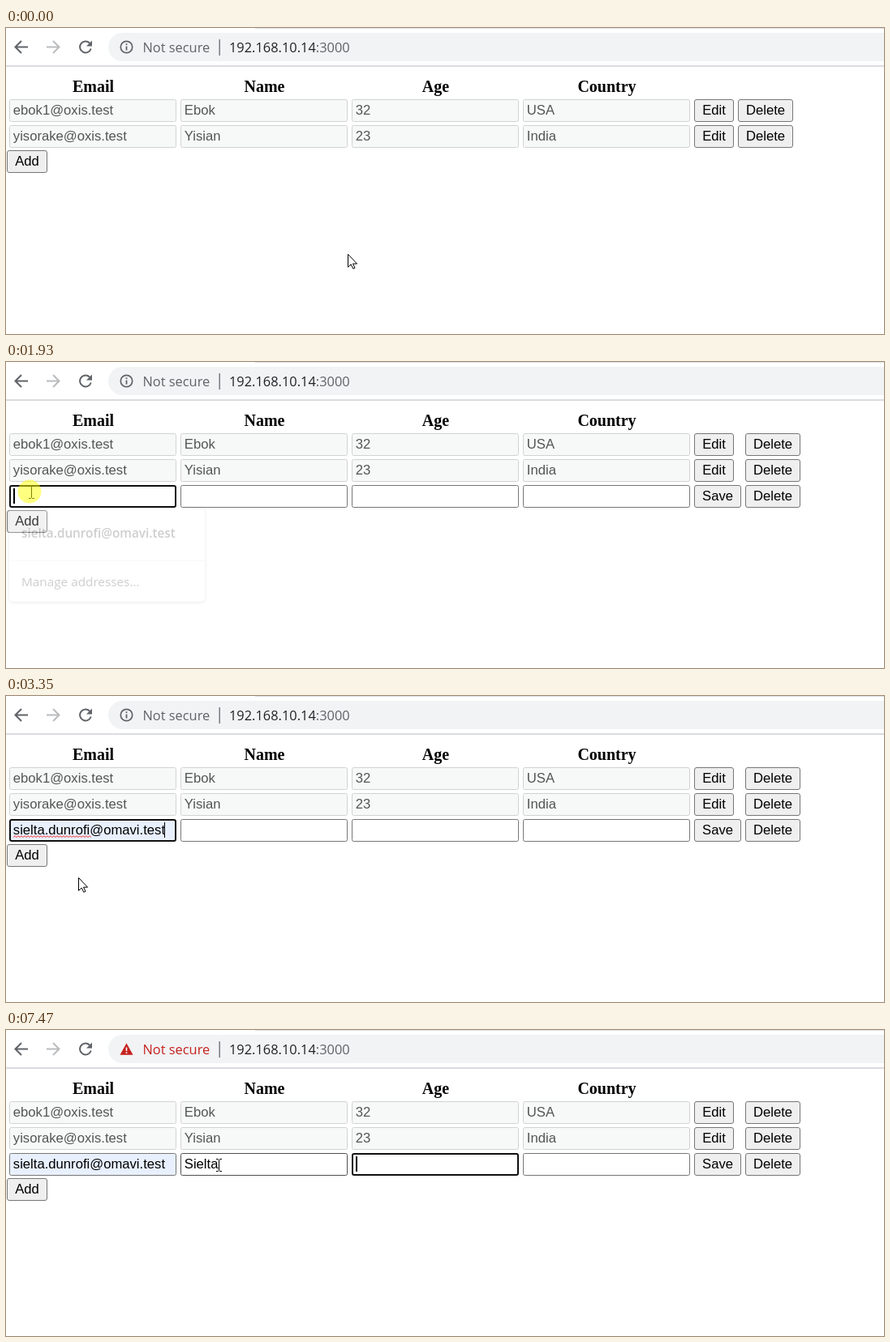
Write an HTML page that moves like this. It is 1082 px wide and 378 px high and loops after 8 s.

```html
<!DOCTYPE html>
<html lang="en">
<head>
<meta charset="utf-8">
<title>Editable table</title>
<style>
  html, body { margin: 0; width: 100%; height: 100%; overflow: hidden; background: #fff; }
  svg { display: block; }
  text { white-space: pre; font: 16.667px "Liberation Sans", Arial, sans-serif; }
  .head { font: bold 20px "Liberation Serif", "Times New Roman", serif; text-anchor: middle; }
  .bar { font: 16.4px "Open Sans", "Noto Sans", sans-serif; }
  .menu { font: 15.3px "Open Sans", "Noto Sans", sans-serif; fill: #2c2d30; }
  .strong { font-weight: 600; }
  .mid { text-anchor: middle; }
</style>
</head>
<body>
<svg id="stage" width="1082" height="378" viewBox="0 0 1082 378"></svg>
<script>
const LOOP = 8000;
const EMAIL = "sielta.dunrofi@omavi.test";
const NAME = "Sielta";
const ROW = 32, FIELD = 206, HEIGHT = 28;
const colX = i => 4 + 211 * i;
const rowY = r => 88 + ROW * r;
const stage = document.getElementById("stage");

function set(el, attrs) {
  for (const k in attrs) el.setAttribute(k, attrs[k]);
}
function add(tag, attrs, parent = stage, text) {
  const el = document.createElementNS("http://www.w3.org/2000/svg", tag);
  set(el, attrs);
  if (text !== undefined) el.textContent = text;
  parent.appendChild(el);
  return el;
}
const group = () => add("g", {});
const show = (el, on) => set(el, { visibility: on ? "visible" : "hidden" });
const place = (el, x, y) => set(el, { transform: `translate(${x} ${y})` });
const line = (d, stroke, width, parent) =>
  add("path", { d, stroke, "stroke-width": width, fill: "none" }, parent);

function field(col, row, value, parent, locked) {
  const x = colX(col), y = rowY(row);
  const box = add("rect", {
    x: x + .5, y: y + .5, width: FIELD - 1, height: HEIGHT - 1, rx: 2,
    fill: locked ? "#f7f9f8" : "#fff", stroke: locked ? "#d1d3d2" : "#767676"
  }, parent);
  const text = add("text", { x: x + 4.8, y: y + 19, fill: locked ? "#545454" : "#000" }, parent, value);
  return { box, text, x, y };
}

function button(x, y, w, label, parent) {
  const g = add("g", {}, parent);
  place(g, x, y);
  const box = add("rect", {
    x: .5, y: .5, width: w - 1, height: HEIGHT - 1, rx: 2.5, fill: "#efefef", stroke: "#767676"
  }, g);
  add("text", { x: w / 2, y: 19, class: "mid" }, g, label);
  return { g, box };
}

// Browser toolbar
add("rect", { x: 307, y: 0, width: 775, height: 1, fill: "#dee1e6" });
add("rect", { x: 0, y: 46, width: 1082, height: 2, fill: "#dadce0" });
add("rect", { x: 126, y: 6, width: 990, height: 35, rx: 17.5, fill: "#f1f3f4" });
line("M27 23.5H11.5M19 16L11.5 23.5 19 31", "#5f6368", 2);
line("M50 23.5H65.5M58 16L65.5 23.5 58 31", "#babcbe", 2);
line("M103 18.5A7 7 0 1 0 104.7 25.5", "#5f6368", 2);
add("path", { d: "M106 15.5V22.5H99Z", fill: "#5f6368" });

const info = group();
add("circle", { cx: 148.5, cy: 23.5, r: 7.2, fill: "none", stroke: "#5f6368", "stroke-width": 1.7 }, info);
line("M148.5 22.5V27.5M148.5 19.2V21", "#5f6368", 1.8, info);
const warn = group();
add("path", { d: "M148.5 16.2L156.5 30.8H140.5Z", fill: "#c5221f" }, warn);
line("M148.5 21.5V26M148.5 27.3V29", "#fff", 1.6, warn);
const secure = add("text", { x: 168.5, y: 30, class: "bar" }, stage, "Not secure");
add("rect", { x: 262.5, y: 14, width: 1.4, height: 20, fill: "#6f7377" });
const url = add("text", { x: 275, y: 30, class: "bar", fill: "#202124" }, stage, "192.168.10.14");
add("tspan", { fill: "#5f6368" }, url, ":3000");

// Table
const heads = ["Email", "Name", "Age", "Country"];
heads.forEach((label, i) => add("text", { x: colX(i) + 103.5, y: 79, class: "head" }, stage, label));
const deletes = [
  ["ebok1@oxis.test", "Ebok", "32", "USA"],
  ["yisorake@oxis.test", "Yisian", "23", "India"]
].map((values, r) => {
  values.forEach((value, i) => field(i, r, value, stage, true));
  button(848, rowY(r), 49, "Edit");
  return button(902, rowY(r), 68, "Delete").g;
});
const newRow = group();
const inputs = heads.map((_, i) => field(i, 2, "", newRow));
button(848, rowY(2), 58, "Save", newRow);
button(911, rowY(2), 68, "Delete", newRow);
const addButton = button(1, 151, 50, "Add");
const squiggle = line("M9 174.5" + "l2 -1.8l2 1.8".repeat(24), "#f03030", 1);
const caret = add("rect", { y: 156, height: 19 });

// Autofill popup
const popup = group();
popup.style.filter = "drop-shadow(0 1px 2px rgba(0,0,0,.4))";
add("rect", { x: 4, y: 180, width: 241, height: 116, rx: 5, fill: "#fff" }, popup);
const choice = add("rect", { x: 4, y: 187, width: 241, height: 49, fill: "#e8e9ea" }, popup);
add("rect", { x: 4, y: 245, width: 241, height: 1, fill: "#e3e4e6" }, popup);
add("text", { x: 19, y: 217, class: "menu strong" }, popup, EMAIL);
add("text", { x: 19, y: 277, class: "menu" }, popup, "Manage addresses…");

// Pointer
const arrow = add("path", {
  d: "M.5 .5V16.4L4.2 13 6.8 18.4 9 17.4 6.5 12.2H11.6Z", fill: "#fff", stroke: "#000"
});
const beam = line("M-3.5 -7.5H-1L0 -6.5 1 -7.5H3.5M0 -6.5V6.5M-3.5 7.5H-1L0 6.5 1 7.5H3.5", "#000", 1);
const halo = add("circle", { r: 14.5, fill: "#ff0", opacity: .5 });

// Script of the session, in ms
const grow = 1150, open = 1860, pick = 3350, toName = 4440, toAge = 7470;
const keys = [5450, 5770, 6000, 6230, 6540, 6700];
const wakes = [open, pick, toName, ...keys, toAge];
const clicks = [[1000, grow], [open, 2020], [3190, pick], [toName, 4520]];
const BLINK = 540, STEP = 75;

// Pointer strokes: begin, end, target and an optional bend point
const home = { x: 421, y: 279 };
const strokes = [
  { from: 70, to: 680, x: 28, y: 164, bend: { x: 330, y: 331 } },
  { from: 1560, to: 1630, x: 29, y: 160 },
  { from: 2660, to: 2960, x: 89, y: 224, bend: { x: 81, y: 173 } },
  { from: 3420, to: 3590, x: 257, y: 139, bend: { x: 170, y: 150 } },
  { from: 3820, to: 3970, x: 258, y: 146 },
  { from: 4140, to: 4290, x: 260, y: 166 }
];

const curve = (a, b, c, u) => a * (1 - u) ** 2 + 2 * b * u * (1 - u) + c * u * u;

function pointer(t) {
  let p = home;
  for (const s of strokes) {
    if (t < s.from) break;
    const steps = Math.round((s.to - s.from) / STEP) + 1;
    const k = Math.min(1, (Math.round((t - s.from) / STEP) + 1) / steps);
    const u = 1 - (1 - k) ** 1.5;
    const bend = s.bend || { x: (p.x + s.x) / 2, y: (p.y + s.y) / 2 };
    p = { x: curve(p.x, bend.x, s.x, u), y: curve(p.y, bend.y, s.y, u) };
  }
  return { x: Math.round(p.x), y: Math.round(p.y) };
}

const inside = (p, x, y, w) => p.x >= x && p.x < x + w && p.y >= y && p.y < y + HEIGHT;

function draw(t) {
  const p = pointer(t);
  const pressed = clicks.some(([down, up]) => t >= down && t < up);
  const active = [open, toName, toAge].filter(time => t >= time).length - 1;
  const typed = keys.filter(time => t >= time).length;
  const fade = t < pick ? Math.max(0, Math.min(1, (t - open) / 310)) : 0;
  const grown = t >= grow, filled = t >= pick;
  const preview = fade > 0 && inside(p, 4, 198, 241);

  show(info, !typed);
  show(warn, typed);
  set(secure, { fill: typed ? "#c5221f" : "#5f6368" });

  show(newRow, grown);
  deletes.forEach((g, r) => place(g, grown ? 911 : 902, rowY(r)));
  const addY = grown ? 151 + ROW : 151;
  const over = !fade && inside(p, 1, addY, 50);
  place(addButton.g, 1, addY);
  set(addButton.box, {
    fill: over ? (pressed ? "#f5f5f5" : "#e5e5e5") : "#efefef",
    stroke: over && !pressed ? "#4f4f4f" : "#767676"
  });

  inputs[0].text.textContent = filled || preview ? EMAIL : "";
  inputs[1].text.textContent = NAME.slice(0, typed);
  let onField = false;
  inputs.forEach((f, i) => {
    const hover = grown && inside(p, f.x, f.y, FIELD);
    const on = i === active, edge = on ? 1 : .5;
    onField = onField || hover;
    set(f.box, {
      x: f.x + edge, y: f.y + edge, width: FIELD - 2 * edge, height: HEIGHT - 2 * edge,
      stroke: on ? "#101010" : hover ? "#4f4f4f" : "#767676", "stroke-width": 2 * edge,
      fill: i === 0 && (filled || preview) ? "#e8f0fe" : "#fff"
    });
  });
  show(squiggle, filled && active === 0);

  const awake = wakes.findLast(time => t >= time);
  show(caret, active >= 0 && !preview && Math.floor((t - awake) / BLINK) % 2 === 0);
  if (active >= 0) {
    const { x, text } = inputs[active];
    const empty = !text.textContent;
    set(caret, {
      x: empty ? x + 5 : Math.floor(x + 4.7 + text.getComputedTextLength()),
      width: empty ? 2 : 1
    });
  }

  show(popup, fade > 0);
  popup.style.opacity = fade;
  show(choice, preview);

  show(halo, pressed);
  show(arrow, !onField);
  show(beam, onField);
  place(halo, p.x, p.y);
  place(arrow, p.x, p.y);
  place(beam, p.x + 2.5, p.y + 1);
}

const start = performance.now();
function tick() {
  draw((performance.now() - start) % LOOP);
  requestAnimationFrame(tick);
}
tick();
</script>
</body>
</html>
```
